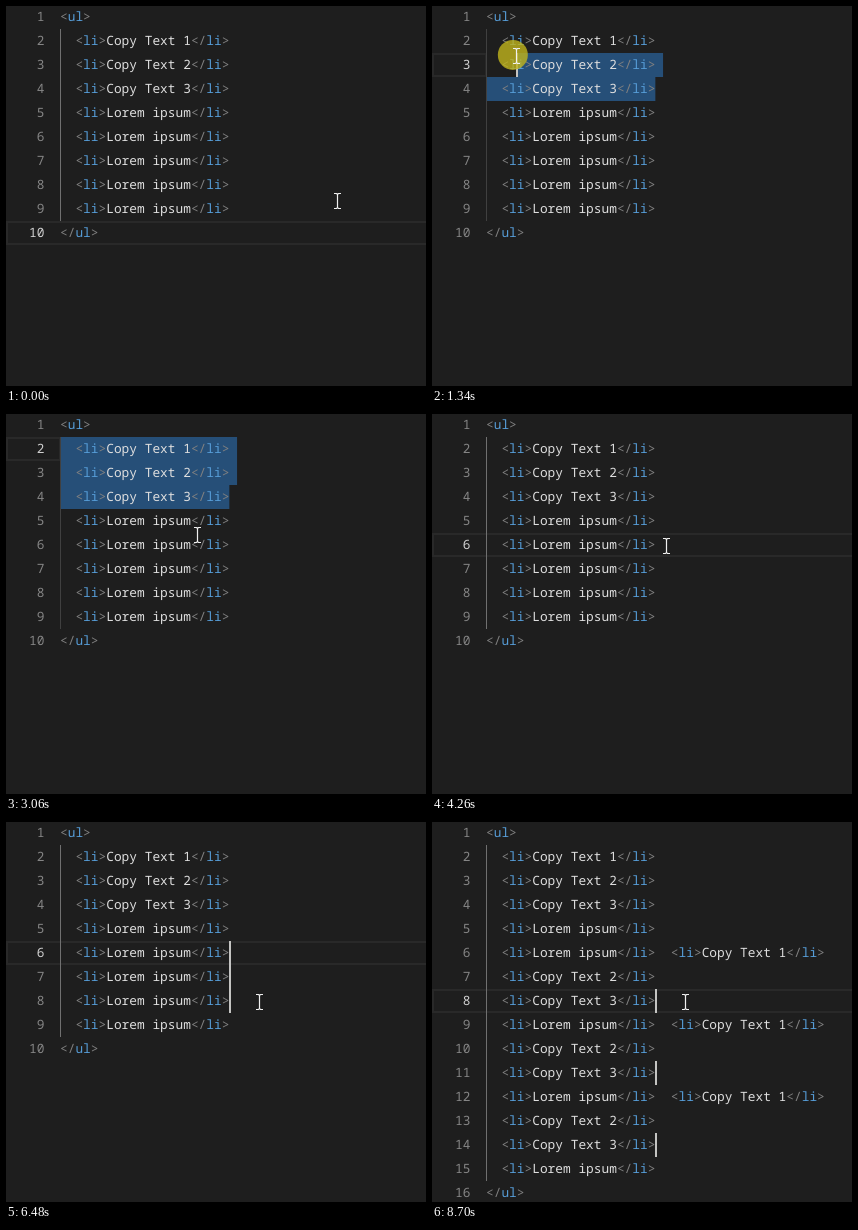
An HTML page for the animation above (9.21 s loop, 420 px wide and 380 px high).

```html
<!DOCTYPE html>
<html lang="en">
<head>
<meta charset="utf-8">
<title>Multi-cursor paste</title>
<style>
  html, body { margin: 0; width: 100%; height: 100%; overflow: hidden; background: #1e1e1e; }
  svg { display: block; width: 420px; height: 380px; }
  text {
    font: 12.83px "Noto Sans Mono", "DejaVu Sans Mono", monospace;
    white-space: pre;
    text-rendering: geometricPrecision;
    fill: #dedede;
  }
  .num { text-anchor: end; fill: #858585; }
  .num.on { fill: #d0d0d0; }
  .br { fill: #808080; }
  .tag { fill: #569cd6; }
  .sel { fill: #264f78; }
  .caret { fill: #c4c4c2; }
  #row { fill: none; stroke: #292929; stroke-width: 2; }
</style>
</head>
<body>
<svg viewBox="0 0 420 380">
  <rect width="420" height="380" fill="#1e1e1e"/>
  <rect id="row" x="1" height="22"/>
  <g id="sels"></g>
  <rect id="guide" x="54" y="23" width="1"/>
  <g id="before"></g>
  <g id="after"></g>
  <g id="carets"></g>
  <path id="fold" d="M43 8l5 5 5-5" fill="none" stroke="#c5c5c5" stroke-width="1.6"/>
  <circle id="press" r="15" fill="#c0b41c" fill-opacity=".8"/>
  <path id="beam" d="M-3.5-7.5h2.5l1 1 1-1h2.5M0-6.5v13M-3.5 7.5h2.5l1-1 1 1h2.5" fill="none" stroke="#f0f0f0" stroke-width="1.2"/>
  <path id="arrow" d="M0 0v17l4-3.6 2.9 6.6 2.9-1.3-2.9-6.3h5.4z" fill="#fff" stroke="#111" stroke-width="1"/>
</svg>
<script>
const LOOP = 9210, LEFT = 54, CHAR = 7.698, COLS = 22;
const $ = id => document.getElementById(id);
const lineTop = n => 24 * n - 25;

function add(box, tag, attrs, text) {
  const el = document.createElementNS('http://www.w3.org/2000/svg', tag);
  set(el, attrs);
  if (text) el.textContent = text;
  box.appendChild(el);
  return el;
}
function set(el, attrs) {
  for (const k in attrs) el.setAttribute(k, attrs[k]);
}
function show(el, on) {
  el.style.display = on ? '' : 'none';
}

// Code listings, before and after the paste
const li = s => `  <li>${s}</li>`;
const copy = [1, 2, 3].map(n => li('Copy Text ' + n));
const lorem = li('Lorem ipsum');
const pasted = [lorem + copy[0], copy[1], copy[2]];
const listing = body => ['<ul>', ...body, '</ul>'];

function build(group, lines) {
  return lines.map((line, i) => {
    const y = lineTop(i + 1) + 16;
    const num = add(group, 'text', { x: 38.5, y, class: 'num' }, String(i + 1));
    const row = add(group, 'text', { x: LEFT, y });
    for (const part of line.match(/<\/?|>|[^<>]+/g)) {
      const cls = /[<>]/.test(part) ? 'br' : /^(ul|li)$/.test(part) ? 'tag' : '';
      add(row, 'tspan', { class: cls }, part);
    }
    return num;
  });
}
const nums = [
  build($('before'), listing([...copy, ...Array(5).fill(lorem)])),
  build($('after'), listing([...copy, lorem, ...pasted, ...pasted, ...pasted, lorem]))
];
const sels = [2, 3, 4].map(n => add($('sels'), 'rect', { y: lineTop(n), height: 24, class: 'sel' }));
const carets = [0, 1, 2].map(() => add($('carets'), 'rect', { width: 2, height: 24, class: 'caret' }));

// Pointer path: time, x, y
const path = [
  [0, 331, 195], [590, 246, 76], [910, 246, 76], [1340, 84, 50], [1650, 50, 35],
  [1860, 38, 27], [2000, 61, 39], [2250, 124, 85], [2370, 124, 85], [3060, 191, 121],
  [3340, 281, 136], [3470, 234, 132], [4360, 234, 132], [4590, 237, 140],
  [4870, 237, 140], [5000, 245, 156], [5690, 245, 156], [5970, 253, 180], [LOOP, 253, 180]
];
const slope = (i, d) => path[i] && path[i + 1]
  ? (path[i + 1][d] - path[i][d]) / (path[i + 1][0] - path[i][0]) : 0;

// Monotone cubic, so that the pointer never overshoots a stop
function tangent(i, d) {
  const a = slope(i - 1, d), b = slope(i, d);
  return a * b > 0 ? 2 * a * b / (a + b) : 0;
}
function pointer(t) {
  const i = path.findIndex((p, k) => t < path[k + 1][0]);
  const a = path[i], b = path[i + 1], h = b[0] - a[0], u = (t - a[0]) / h;
  const s = u * u * (3 - 2 * u);
  return [1, 2].map(d => a[d] + (b[d] - a[d]) * s
    + h * u * (1 - u) * (tangent(i, d) * (1 - u) - tangent(i + 1, d) * u));
}

const within = (t, spans) => spans.some(([a, b]) => t >= a && t < b);
const clamp = (v, lo, hi) => Math.max(lo, Math.min(hi, v));
const presses = [[740, 1810], [3750, 3850], [5200, 5410], [6300, 6480]];
const blinks = [[0, 780], [1910, 2420], [2920, 3430], [4260, 4770], [5740, 6300], [6890, 7370], [8240, 8700]];

function caretLines(t) {
  if (t < 3750) return [4];
  if (t < 5200) return [6];
  if (t < 6300) return [6, 7];
  return t < 7730 ? [6, 7, 8] : [8, 11, 14];
}

function render(t) {
  const [x, y] = pointer(t);
  const selecting = t >= 960 && t < 3750, done = t >= 7730;
  let lines = caretLines(t), col = COLS;
  if (selecting) {
    const held = t >= 1860;
    lines = [held ? 2 : clamp(Math.floor((y + 25) / 24), 2, 4)];
    col = held ? 0 : clamp(Math.round((x - LEFT) / CHAR), 0, COLS);
  }
  const active = t < 780 ? 10 : lines[0];

  show($('before'), !done);
  show($('after'), done);
  nums[+done].forEach((el, i) => el.classList.toggle('on', i + 1 === active));
  set($('guide'), { height: done ? 336 : 192, fill: selecting ? '#404040' : '#707070' });
  set($('row'), { y: lineTop(t < 960 ? 10 : active) + 1, width: selecting ? 53 : 430 });

  sels.forEach((el, i) => {
    const n = i + 2;
    show(el, selecting && n >= active);
    const from = LEFT + (n === active ? col * CHAR : 0);
    const to = LEFT + (COLS + (n < 4 ? 1 : 0)) * CHAR;
    set(el, { x: from, width: Math.max(0, to - from) });
  });
  const lit = !within(t, blinks);
  carets.forEach((el, i) => {
    show(el, lit && i < lines.length);
    if (i < lines.length) set(el, { x: Math.round(LEFT + col * CHAR - .6), y: lineTop(lines[i]) });
  });

  const gutter = x < LEFT;
  show($('fold'), gutter);
  show($('arrow'), gutter);
  show($('beam'), !gutter);
  const at = { transform: `translate(${Math.round(x) + .5} ${Math.round(y)})` };
  set($('beam'), at);
  set($('arrow'), at);
  show($('press'), within(t, presses));
  set($('press'), { cx: x - 3, cy: y - 1 });
}

const start = performance.now();
function tick() {
  render((performance.now() - start) % LOOP);
  requestAnimationFrame(tick);
}
tick();
</script>
</body>
</html>
```
